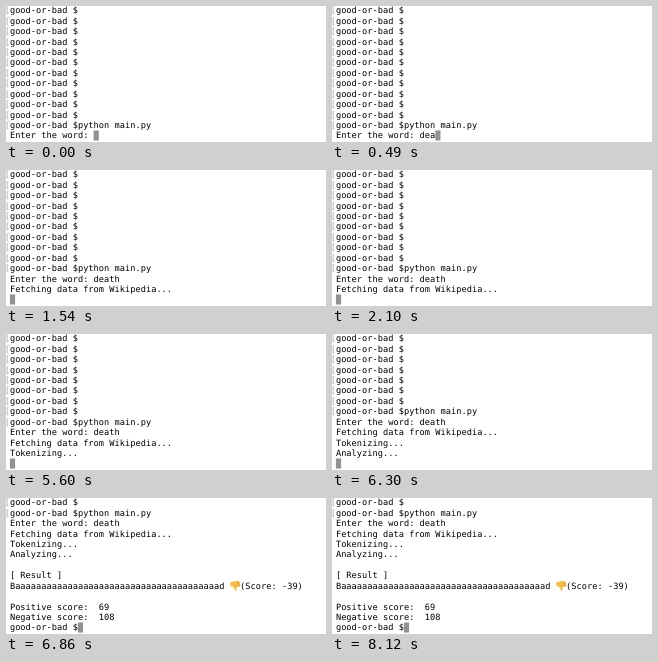
An HTML page for the animation above (8.19 s loop, 320 by 136 pixels).

```html
<!DOCTYPE html>
<html lang="en">
<head>
<meta charset="utf-8">
<title>good-or-bad</title>
<style>
  html, body { margin: 0; width: 100%; height: 100%; overflow: hidden; background: #fff; }
  svg { display: block; width: 100%; height: 100%; }
  text {
    font: 86.9px "DejaVu Sans Mono", monospace;
    font-variant-ligatures: none;
    text-rendering: geometricPrecision;
    white-space: pre;
  }
  .mark { fill: #a6a6a6; }
</style>
</head>
<body>
<svg viewBox="0 0 320 136">
  <rect id="cursor" width="5.2" height="10.1" fill="#929292"/>
  <g id="rows" transform="scale(.1)"></g>
  <g id="thumb" visibility="hidden">
    <path fill="#f6bd45" d="M.7 1.6Q3 .7 5 .5L8.5.4Q9.8.5 9.7 1.7Q10.7 2.1 10.3 3.1Q11.2 3.7 10.6 4.7Q11.1 6.1 9.6 6.2L6.7 6.3Q7.2 8 6.9 9.4Q6.4 10.7 5.4 9.9Q5.3 8.2 4.1 7.1L2.8 5.8L.7 5.6Z"/>
    <path fill="none" stroke="#c98529" stroke-width=".45" d="M9.7 1.7H7.6M10.3 3.1H7.5M10.6 4.7H7.4M6.7 6.3L5.4 5.9"/>
  </g>
</svg>
<script>
const LOOP = 8190, ROWS = 13;
const LEFT = 3.9, TOP = -0.8, CELL = 5.231, PITCH = 10.43, BASELINE = 8.1;
const PROMPT = "good-or-bad $";

const result = [
  "", "[ Result ]",
  "B" + "a".repeat(39) + "d   (Score: -39)",
  "", "Positive score:  69", "Negative score:  108", ""
].join("\n");

// Each entry prints its text at the given time.
const output = [
  [0, (PROMPT + "\n").repeat(11) + PROMPT + "python main.py\nEnter the word: "],
  [210, "d"], [350, "e"], [490, "a"], [630, "t"], [840, "h"],
  [1540, "\nFetching data from Wikipedia...\n"],
  [5600, "Tokenizing...\n"],
  [5670, "Analyzing...\n"],
  [6580, result],
  [6650, PROMPT]
];

const byId = id => document.getElementById(id);
const cursor = byId("cursor"), thumb = byId("thumb");

function addText(x, row, className) {
  const node = document.createElementNS("http://www.w3.org/2000/svg", "text");
  node.setAttribute("x", x * 10);
  node.setAttribute("y", (TOP + row * PITCH + BASELINE) * 10);
  node.setAttribute("class", className);
  byId("rows").append(node);
  return node;
}

const rows = Array.from({ length: ROWS }, (_, row) => ({
  mark: addText(LEFT - CELL, row, "mark"),
  line: addText(LEFT, row, "line")
}));

function place(node, column, row, dy) {
  const x = LEFT + column * CELL, y = TOP + row * PITCH + dy;
  node.setAttribute("transform", `translate(${x} ${y})`);
}

function print(screen) {
  const lines = screen.split("\n").slice(-ROWS);
  const last = lines.length - 1;
  rows.forEach(({ mark, line }, row) => {
    line.textContent = lines[row];
    mark.textContent = row < last && lines[row].startsWith(PROMPT) ? "[" : "";
  });
  place(cursor, lines[last].length, last, 0.1);

  const scoreRow = lines.findIndex(line => line.includes("(Score"));
  thumb.setAttribute("visibility", scoreRow < 0 ? "hidden" : "visible");
  if (scoreRow >= 0) place(thumb, 42, scoreRow, 0);
}

let shown = null;
const start = performance.now();

function frame() {
  const time = (performance.now() - start) % LOOP;
  const screen = output.filter(([at]) => at <= time).map(([, text]) => text).join("");
  if (screen !== shown) print(shown = screen);
  requestAnimationFrame(frame);
}
frame();
</script>
</body>
</html>
```
